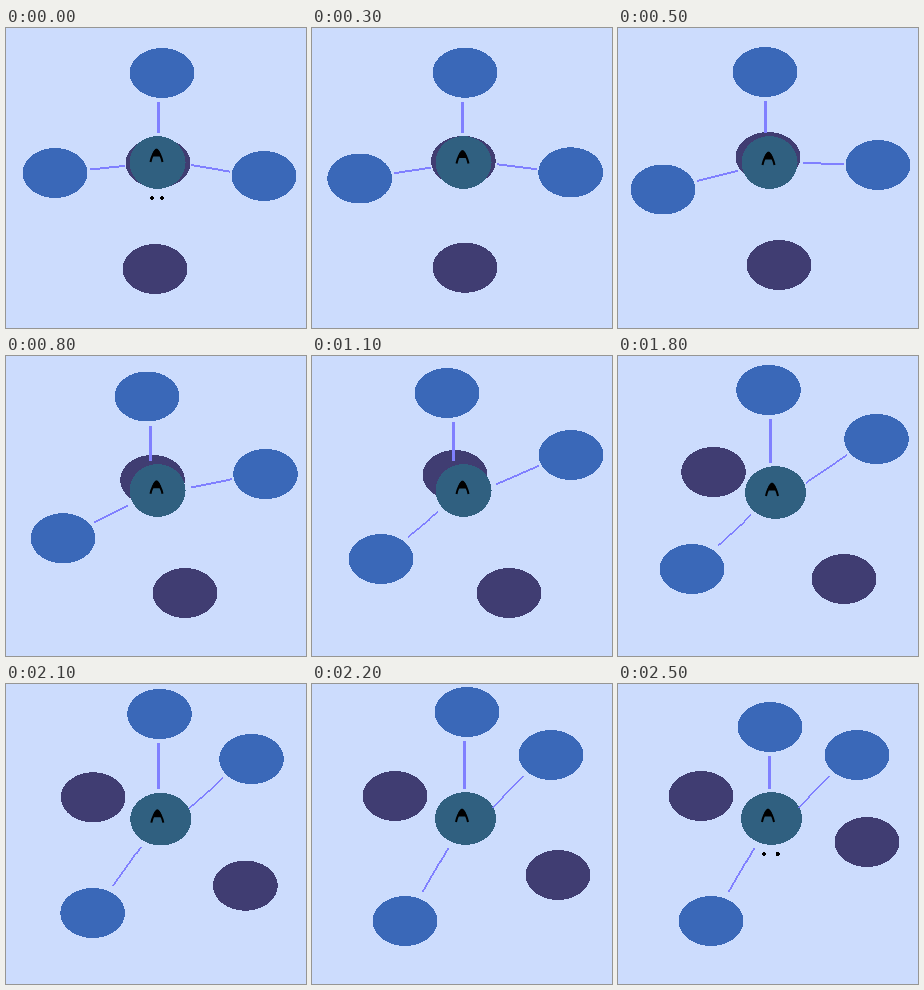
An HTML page with a canvas for the animation above (2600 ms loop, 300 by 300 pixels).

```html
<!DOCTYPE html>
<html>
<head>
<meta charset="utf-8">
<style>
html, body { margin: 0; width: 100%; height: 100%; overflow: hidden; background: #ccdcfd; }
canvas { display: block; width: 300px; height: 300px; }
</style>
</head>
<body>
<canvas id="stage" width="300" height="300"></canvas>
<script>
const ctx = document.getElementById('stage').getContext('2d');
const SKY = '#ccdcfd', BLUE = '#3a68b8', DARK = '#403d72', TEAL = '#306080', LINE = '#8080ff';

// The pose changes on 100 ms ticks; a few poses are held longer.
const TICK = 100, POSES = 20;
const holds = { 0: 3, 12: 2, 13: 2, 14: 2, 17: 2 };
const slots = Array.from({ length: POSES }, (_, pose) => Array(holds[pose] || 1).fill(pose)).flat();
const blinks = [0, 13, 19];

// Each body glides through its points, reached at these poses.
const keyPoses = [0, 3, 9, 12, 14, 17, 19];
const paths = {
  top: [[156, 45], [147, 44], [135, 37], [147.5, 38], [150.5, 34], [155, 28], [152, 43]],
  right: [[258, 148], [260, 137], [259, 99], [262.5, 84], [258.5, 83], [239, 71]],
  left: [[49, 145], [45, 161.5], [69, 203], [74, 213], [74, 213], [93, 237]],
  low: [[149, 241], [161, 237], [197, 237], [226, 223], [226, 223], [246, 191], [249, 158]],
  inner: [[152, 135], [150, 129], [143, 119], [111.5, 107], [95.5, 116], [83, 112]]
};

const ramp = (from, to, t) => Math.min(1, Math.max(0, (t - from) / (to - from)));

function along(path, pose) {
  let [x, y] = path[0];
  for (let i = 1; i < path.length; i++) {
    const k = ramp(keyPoses[i - 1], keyPoses[i], pose);
    x += (path[i][0] - path[i - 1][0]) * k;
    y += (path[i][1] - path[i - 1][1]) * k;
  }
  return { x, y };
}

// Hard-edged ellipse, filled row by row
function ellipse({ x, y }, rx, ry, color) {
  ctx.fillStyle = color;
  for (let row = Math.floor(y - ry); row < y + ry; row++) {
    const v = (row + 0.5 - y) / ry;
    if (Math.abs(v) >= 1) continue;
    const half = rx * Math.sqrt(1 - v * v);
    const start = Math.round(x - half);
    ctx.fillRect(start, row, Math.round(x + half) - start, 1);
  }
}

// Hard-edged line, stepped along its longer axis
function line(a, b, width) {
  const dx = b.x - a.x, dy = b.y - a.y;
  const flat = Math.abs(dx) > Math.abs(dy);
  const steps = Math.ceil(Math.max(Math.abs(dx), Math.abs(dy)));
  ctx.fillStyle = LINE;
  for (let i = 0; i <= steps; i++) {
    const x = a.x + dx * i / steps, y = a.y + dy * i / steps;
    if (flat) ctx.fillRect(Math.round(x), Math.round(y - width / 2), 1, width);
    else ctx.fillRect(Math.round(x - width / 2), Math.round(y), width, 1);
  }
}

// Joins hub and satellite, leaving a gap around both; reach is the hub's vertical gap.
function spoke(hub, sat, reach) {
  const angle = Math.atan2(sat.y - hub.y, sat.x - hub.x);
  const cos = Math.cos(angle), sin = Math.sin(angle);
  line({ x: hub.x + cos * 34, y: hub.y + sin * reach },
    { x: sat.x - cos * 35, y: sat.y - sin * 35 }, 2);
}

function drawMark(x, y) {
  ctx.fillStyle = ctx.strokeStyle = '#000';
  ctx.lineWidth = 2;
  ctx.beginPath();
  ctx.moveTo(x - 4.5, y + 1);
  ctx.quadraticCurveTo(x - 4, y - 5, x, y - 7);
  ctx.quadraticCurveTo(x + 4, y - 5, x + 4.5, y + 1);
  ctx.fill();
  for (const side of [-1, 1]) {
    ctx.beginPath();
    ctx.moveTo(x, y - 6);
    ctx.quadraticCurveTo(x + side * 4.5, y - 1, x + side * 6, y + 6.5);
    ctx.stroke();
  }
}

function draw(pose) {
  ctx.fillStyle = SKY;
  ctx.fillRect(0, 0, 300, 300);

  const body = {};
  for (const name in paths) {
    body[name] = along(paths[name], pose);
    ellipse(body[name], 32.3, 25, name === 'low' || name === 'inner' ? DARK : BLUE);
  }

  // The hub swells and sways right, then drifts back.
  const swell = ramp(9, 12, pose), back = ramp(14, 17, pose);
  const hub = { x: 151.5 + 6 * swell - 4 * back, y: 134.5 + 2 * (swell - back) };
  ellipse(hub, 28 + 2.5 * swell, 26.3, TEAL);

  const stemX = (body.top.x + hub.x) / 2 - 1.5;
  line({ x: stemX, y: body.top.y + 29 }, { x: stemX, y: hub.y - 31 }, 3);
  spoke(hub, body.left, 34);
  spoke(hub, body.right, 20);

  drawMark(hub.x - 1 - 2.5 * swell, hub.y - 3 - 4 * 0.63 ** pose);

  if (blinks.includes(pose)) {
    const y = hub.y + 35.5;
    ellipse({ x: 146, y }, 2, 2.2, '#000');
    ellipse({ x: 156 + pose / 5, y }, 2, 2.2, '#000');
  }
}

function tick() {
  draw(slots[Math.floor(performance.now() / TICK) % slots.length]);
  requestAnimationFrame(tick);
}
tick();
</script>
</body>
</html>
```
